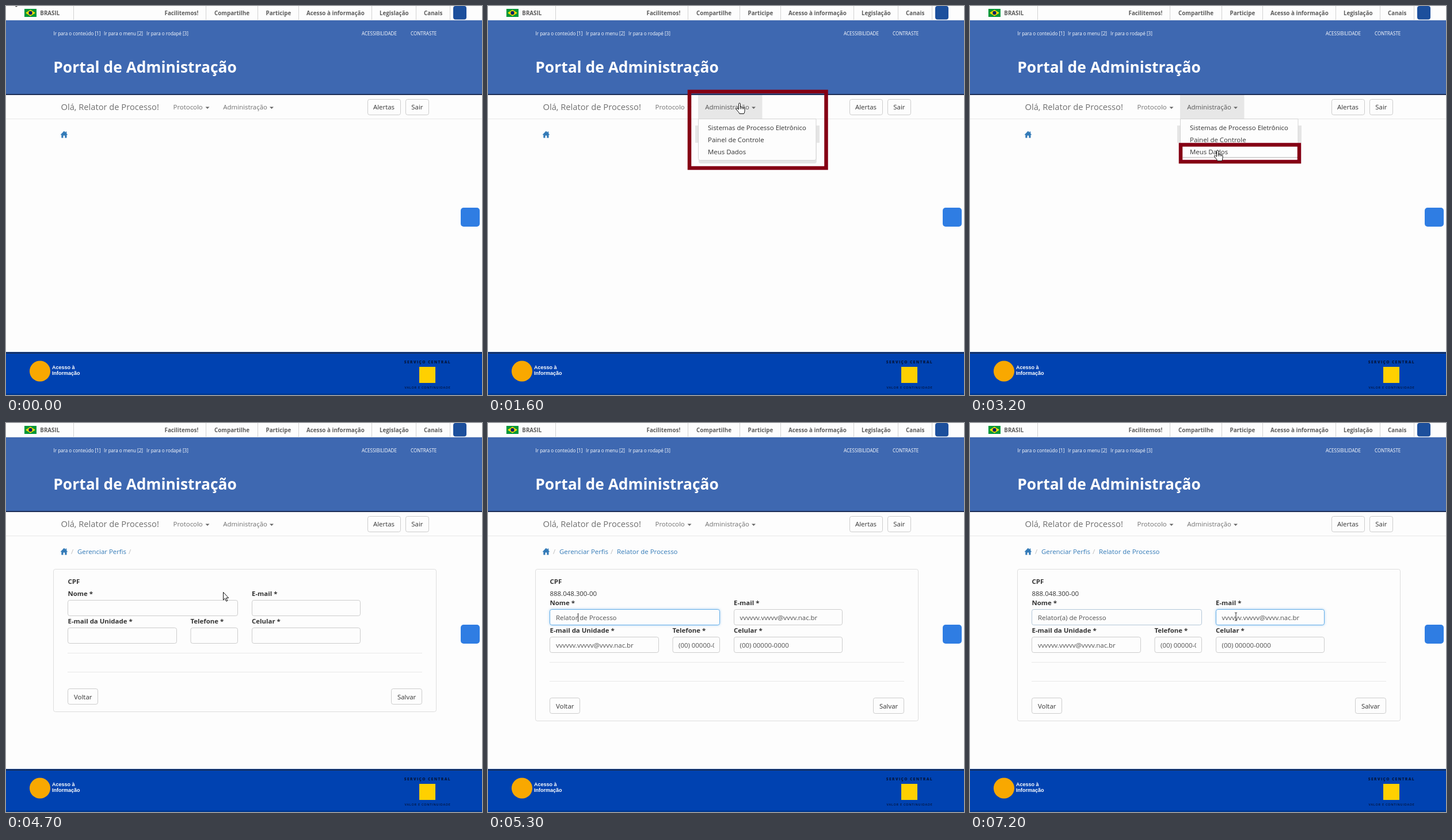
An HTML page that plays this animation: 827x677 px, repeating every 8000 ms.

```html
<!DOCTYPE html>
<html lang="pt-BR">
<head>
<meta charset="utf-8">
<title>Portal de Administração</title>
<style>
  html, body { margin: 0; width: 100%; height: 100%; overflow: hidden; background: #fdfdfd; }
  svg { display: block; }
  text { font: 11.43px "Open Sans", sans-serif; fill: #333; white-space: pre; }
  .bar text { font-size: 9.8px; font-weight: 700; fill: #5c5c5c; }
  .skip text { font-size: 8.1px; fill: #fff; }
  .title { font-size: 26.4px; font-weight: 700; fill: #fff; }
  .nav text { fill: #707070; }
  .nav .brand { font-size: 14.7px; }
  .nav path { fill: #666; }
  .nav .hover text, .nav .hover path { fill: #222; }
  .nav .open text { fill: #555; }
  .button rect, .field { fill: #fdfdfd; stroke: #ccc; }
  .crumbs text { fill: #337ab7; }
  .crumbs .slash { fill: #bbb; }
  .label text { font-weight: 700; }
  .value text { fill: #505050; }
  .field.focus { stroke: #66afe9; filter: drop-shadow(0 0 2px rgba(102, 175, 233, .6)); }
  .field.fading { stroke: #b3c7d8; }
  .rule { stroke: #e8e8e8; }
  .access text { font: 700 9px "Liberation Sans", Arial, sans-serif; fill: #fff; }
  .seal { text-anchor: middle; fill: #04163f; }
  .seal.top { font-size: 6.6px; font-weight: 800; letter-spacing: 1.4px; }
  .seal.bottom { font-size: 5.6px; font-weight: 600; letter-spacing: .7px; }
  .mark { fill: none; stroke: #850014; }
  .pointer { fill: #fff; stroke: #111; stroke-linejoin: round; }
</style>
</head>
<body>
<svg width="827" height="677" viewBox="0 0 827 677">
  <rect width="827" height="677" fill="#fdfdfd"/>

  <g class="bar">
    <rect x="32" y="5" width="21" height="14" fill="#009739"/>
    <path d="M34 12l8.5-5.5 8.5 5.5-8.5 5.5z" fill="#fedd00"/>
    <circle cx="42.5" cy="12" r="3.2" fill="#012169"/>
    <path d="M117.5 0v24M347.5 0v24M437.5 0v24M508.5 0v24M635.5 0v24M712.5 0v24M771.5 0v24" stroke="#d2d2d2"/>
    <text x="59.3" y="15.5">BRASIL</text>
    <text x="275.5" y="15.5">Facilitemos!</text>
    <text x="362" y="15.5">Compartilhe</text>
    <text x="451.5" y="15.5">Participe</text>
    <text x="522" y="15.5">Acesso à informação</text>
    <text x="649" y="15.5">Legislação</text>
    <text x="726" y="15.5">Canais</text>
    <rect x="777" y="0" width="23" height="23.5" rx="4" fill="#1c4f9c"/>
  </g>

  <path d="M0 24.5h827" stroke="#dfe3ea"/>
  <rect y="25" width="827" height="128" fill="#3e68b1"/>
  <rect y="153" width="827" height="2" fill="#1d2e57"/>
  <g class="skip">
    <text x="82.5" y="50.5">Ir para o conteúdo [1]</text>
    <text x="170" y="50.5">Ir para o menu [2]</text>
    <text x="244" y="50.5">Ir para o rodapé [3]</text>
    <text x="618" y="50.5">ACESSIBILIDADE</text>
    <text x="703" y="50.5">CONTRASTE</text>
  </g>
  <text class="title" x="82.3" y="115.6">Portal de Administração</text>

  <path class="rule" d="M0 196.5h827"/>
  <g class="nav">
    <text class="brand" x="95.5" y="181">Olá, Relator de Processo!</text>
    <text x="290.5" y="180">Protocolo</text>
    <path d="M346.5 175.5h7l-3.5 3.5z"/>
    <g id="admin">
      <rect id="adminBack" x="365" y="155" width="111.5" height="41" fill="#e7e7e7"/>
      <text x="377.3" y="180">Administração</text>
      <path d="M458 175.5h7l-3.5 3.5z"/>
    </g>
  </g>
  <g class="button">
    <rect x="628.5" y="162.5" width="57" height="27" rx="3.3"/>
    <rect x="694.5" y="162.5" width="40" height="27" rx="3.3"/>
    <text x="638" y="180">Alertas</text>
    <text x="704.3" y="180">Sair</text>
  </g>

  <g class="crumbs">
    <path d="M94.5 224.2l6.4-6.6 2.6 2.7v-1.9h1.8v3.7l2 2.1h-1.8v5.2h-3.2v-3.8h-2.8v3.8h-3.2v-5.2z" fill="#337ab7"/>
    <g id="profileCrumb">
      <text class="slash" x="113" y="228">/</text>
      <text x="124" y="228">Gerenciar Perfis</text>
      <text class="slash" x="213" y="228">/</text>
    </g>
    <text id="roleCrumb" x="224" y="228">Relator de Processo</text>
  </g>

  <g id="menu">
    <path d="M360 208h216v30h-5v32q0 4-4 4H370q-4 0-4-4v-32h-6z" fill="#e5e5e5"/>
    <path d="M365.5 196.5h204.5v69q0 3-3 3h-198.5q-3 0-3-3z" fill="#fdfdfd" stroke="#d4d4d4"/>
    <text x="382" y="216">Sistemas de Processo Eletrônico</text>
    <text x="382" y="237">Painel de Controle</text>
    <text x="382" y="258">Meus Dados</text>
    <path id="outline" d="M370 263.5h199" stroke="#777" stroke-dasharray="1 1"/>
  </g>
  <rect id="menuMark" class="mark" x="350" y="149" width="237.5" height="133" stroke-width="6.5"/>
  <rect id="itemMark" class="mark" x="366" y="241.5" width="206" height="29.5" stroke-width="6.5"/>

  <g id="form">
    <rect id="panel" x="82.5" y="254.5" width="665" height="248" rx="3.3" fill="#fdfdfd" stroke="#ddd"/>
    <g class="label"><text x="107.5" y="280">CPF</text></g>
    <text id="cpf" x="107.5" y="300.5">888.048.300-00</text>
    <g id="fields">
      <g class="label">
        <text x="107.5" y="300.5">Nome *</text>
        <text x="427" y="300.5">E-mail *</text>
        <text x="107.5" y="348.5">E-mail da Unidade *</text>
        <text x="320.5" y="348.5">Telefone *</text>
        <text x="427" y="348.5">Celular *</text>
      </g>
      <rect id="nameField" class="field" x="107.5" y="308.5" width="295" height="27" rx="3.3"/>
      <rect id="mailField" class="field" x="427.5" y="308.5" width="188" height="27" rx="3.3"/>
      <rect class="field" x="107.5" y="356.5" width="189" height="27" rx="3.3"/>
      <rect class="field" x="321" y="356.5" width="81.5" height="27" rx="3.3"/>
      <rect class="field" x="427.5" y="356.5" width="188" height="27" rx="3.3"/>
      <g id="values" class="value">
        <text id="name" x="118" y="326.8"></text>
        <text x="437.5" y="326.8">vvvvvv.vvvvv@vvvv.nac.br</text>
        <text x="118" y="374.8">vvvvvv.vvvvv@vvvv.nac.br</text>
        <svg x="331" y="357" width="62" height="26"><text y="17.8">(00) 00000-0000</text></svg>
        <text x="437.5" y="374.8">(00) 00000-0000</text>
      </g>
      <path id="caret" d="M0 315v15" stroke="#222"/>
      <path class="rule" d="M107 400.5h616M107 433.5h616"/>
      <g class="button">
        <rect x="107.5" y="462.5" width="52" height="27" rx="3.3"/>
        <rect x="669.5" y="462.5" width="53" height="27" rx="3.3"/>
        <text x="118" y="481">Voltar</text>
        <text x="680" y="481">Salvar</text>
      </g>
    </g>
  </g>

  <rect x="790" y="351" width="33" height="33" rx="5" fill="#2f7de3"/>

  <rect y="602" width="827" height="75" fill="#0042b1"/>
  <rect y="602.5" width="827" height="2.5" fill="#16305f"/>
  <rect y="674.5" width="827" height="2.5" fill="#003890"/>
  <g class="access">
    <circle cx="59" cy="635.5" r="18" fill="#f9a800"/>
    <text x="80" y="631.8">Acesso à</text>
    <text x="80" y="642">Informação</text>
  </g>
  <text class="seal top" x="732.5" y="622">SERVIÇO CENTRAL</text>
  <rect x="718" y="628" width="28" height="28" fill="#ffd000"/>
  <text class="seal bottom" x="732.5" y="666">VALOR E CONTINUIDADE</text>

  <path id="arrow" class="pointer" d="M.5.5v13.5l3-2.8 2.2 5 2.1-.9-2.2-4.9h4.1z"/>
  <path id="hand" class="pointer" d="M-1.5 11V1.5q0-1.5 1.5-1.5t1.5 1.5v5.5q1.3-1 2.7.4 1.5-.9 2.5.6 2-.6 2.3 1.5v4q0 2.5-1.5 5h-7.5q-1-2.8-4-5.5-2.5-2.7-1.2-3.6t3.7 1.6M1.5 7v3.5M4.2 7.4v3.1M6.7 8v2.5"/>
  <path id="beam" d="M0-6.5v13M-2-7q2 0 2 1 0-1 2-1M-2 7q2 0 2-1 0 1 2 1" fill="none" stroke="#333"/>
</svg>

<script>
const LOOP = 8000;
const ids = ['admin', 'adminBack', 'profileCrumb', 'roleCrumb', 'menu', 'outline', 'menuMark', 'itemMark',
  'form', 'panel', 'cpf', 'fields', 'nameField', 'mailField', 'values', 'name', 'caret', 'arrow', 'hand', 'beam'];
const el = Object.fromEntries(ids.map(id => [id, document.getElementById(id)]));

// Pointer steps: [ms, shape, x, y]
const pointer = [
  [0, 'arrow', 11.5, -15],
  [1100, 'hand', 437, 169],
  [3100, 'hand', 433, 228],
  [3200, 'hand', 430, 251],
  [4700, 'arrow', 377, 294],
  [4800, 'beam', 154.5, 339],
  [5300, 'none', 0, 0],
  [7000, 'beam', 250, 341],
  [7100, 'arrow', 409, 352],
  [7200, 'beam', 462, 337]
];

// Characters of the suffix typed so far: [ms, count]
const typing = [[0, 0], [5500, 1], [5700, 2], [5900, 3]];
const stem = 'Relator', suffix = '(a)', rest = ' de Processo';

const stepAt = (table, t) => table.findLast(step => step[0] <= t);
const show = (node, on) => { node.style.display = on ? '' : 'none'; };
const between = (t, from, to) => t >= from && t < to;

function drawPointer(t) {
  let [, shape, x, y] = stepAt(pointer, t);
  if (between(t, 600, 1100)) {
    const p = (Math.floor(t / 100) - 5) / 6;
    const eased = p * p * (3 - 2 * p);
    x += (437 - x) * eased;
    y += (169 - y) * eased;
  }
  for (const kind of ['arrow', 'hand', 'beam']) show(el[kind], kind === shape);
  el[shape]?.setAttribute('transform', `translate(${x} ${y})`);
}

function drawForm(t) {
  const filled = t >= 4800;
  const shift = filled ? 16 : 0;
  show(el.form, t >= 4700);
  show(el.profileCrumb, t >= 4700);
  for (const key of ['roleCrumb', 'cpf', 'values']) show(el[key], filled);
  el.panel.setAttribute('height', 248 + shift);
  el.fields.setAttribute('transform', `translate(0 ${shift})`);

  const editing = between(t, 5300, 7200);
  el.nameField.classList.toggle('focus', editing);
  el.nameField.classList.toggle('fading', t >= 7200);
  el.mailField.classList.toggle('focus', t >= 7200);

  const typed = stepAt(typing, t)[1];
  const value = stem + suffix.slice(0, typed) + rest;
  if (el.name.textContent !== value) el.name.textContent = value;
  show(el.caret, editing);
  if (editing) {
    const x = 118 + el.name.getSubStringLength(0, stem.length + typed);
    el.caret.setAttribute('transform', `translate(${Math.floor(x) + .5} 0)`);
  }
}

function draw(t) {
  const open = between(t, 1300, 4700);
  show(el.menu, open);
  show(el.adminBack, open);
  el.admin.classList.toggle('open', open);
  el.admin.classList.toggle('hover', between(t, 1100, 1300));
  show(el.menuMark, between(t, 1600, 3100));
  show(el.itemMark, between(t, 3200, 4700));
  show(el.outline, between(t, 3200, 4700));
  drawForm(t);
  drawPointer(t);
}

const start = performance.now();
function tick() {
  draw((performance.now() - start) % LOOP);
  requestAnimationFrame(tick);
}
tick();
</script>
</body>
</html>
```
